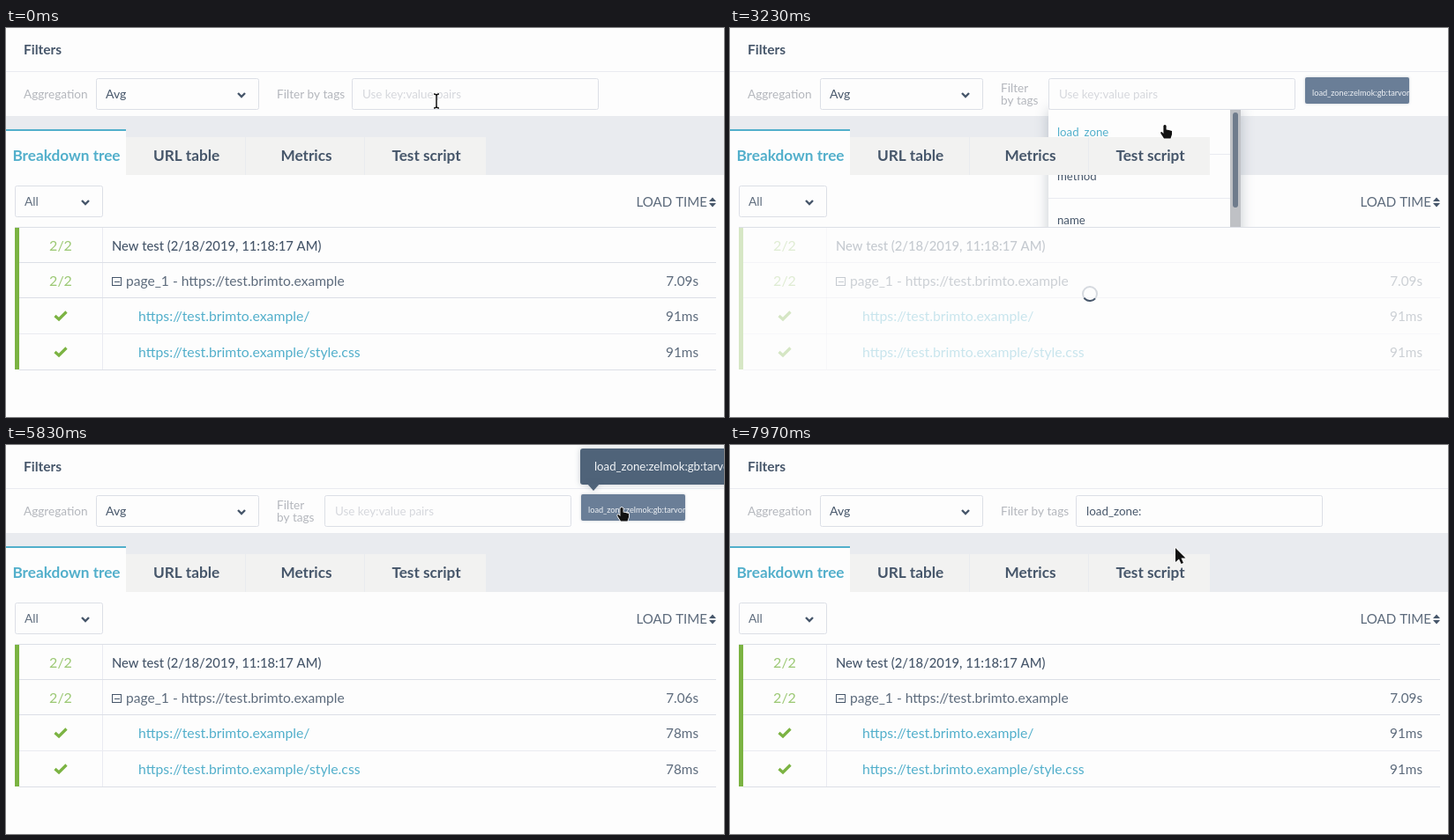
Recreate the animation shown at these times as an HTML page with a canvas. Size 814 px wide and 442 px high, loop 8000 ms.

```html
<!DOCTYPE html>
<html lang="en">
<head>
<meta charset="utf-8">
<title>Filter results by tag</title>
<style>
  html, body { margin: 0; width: 100%; height: 100%; overflow: hidden; background: #fdfdfd; }
  canvas { display: block; }
</style>
</head>
<body>
<canvas id="stage" width="814" height="442"></canvas>
<script>
const ctx = document.getElementById('stage').getContext('2d');
const LOOP = 8000;
const PAPER = '#fdfdfd', INK = '#46566a', SLATE = '#5d6b7c', MUTED = '#b4b7bd', HINT = '#d6d8dd',
      LINE = '#dcdfe6', SOFT = '#eaebf1', BLUE = '#52afcb', GREEN = '#7bb342', BAND = '#e9ebef', TAB = '#f2f2f1';
const SITE = 'https://test.brimto.example';
const TAG = 'load_zone:zelmok:gb:tarvon';
const KEYS = ['load_zone', 'method', 'name', 'proto', 'status'];
const VALUES = ['zelmok:gb:tarvon'];

// Pointer stops: time, x, y
const STOPS = [[0, 488, 83], [650, 488, 83], [1070, 492, 109], [3230, 493, 111], [4270, 493, 111],
  [4670, 685, 94], [5000, 698, 72], [5950, 698, 72], [6560, 510, 78], [6900, 510, 78],
  [7350, 505, 117], [8000, 505, 117]];
const HAND = new Path2D('M-1.6 0Q0-2 1.6 0V4.5L4.5 5 8 6V10L6.5 14.5H-1L-4.5 9Q-5.5 7-3.5 7L-1.6 9Z');
const ARROW = new Path2D('M0 0V16L4 12.5 6.5 18 9 17 6.5 11.5H11.5Z');
const IBEAM = new Path2D('M-3-8Q0-8 0-6Q0-8 3-8M0-6V6M-3 8Q0 8 0 6Q0 8 3 8');

const clamp = v => Math.max(0, Math.min(1, v));
const ramp = (t, from, to) => clamp((t - from) / (to - from));
const within = (t, from, to) => t >= from && t < to;

function text(str, x, y, size, color = INK, weight = 400, align = 'left') {
  ctx.font = `${weight} ${size}px Lato, sans-serif`;
  ctx.textAlign = align;
  ctx.fillStyle = color;
  ctx.fillText(str, x, y);
}

function rect(x, y, w, h, color) {
  ctx.fillStyle = color;
  ctx.fillRect(x, y, w, h);
}

function round(x, y, w, h, r, fill, stroke) {
  ctx.beginPath();
  ctx.roundRect(x, y, w, h, r);
  if (fill) { ctx.fillStyle = fill; ctx.fill(); }
  if (stroke) { ctx.strokeStyle = stroke; ctx.lineWidth = 1; ctx.stroke(); }
}

function line(points, color, width) {
  ctx.beginPath();
  points.forEach(([x, y]) => ctx.lineTo(x, y));
  ctx.strokeStyle = color;
  ctx.lineWidth = width;
  ctx.stroke();
}

function shadowed(blur, draw) {
  ctx.save();
  ctx.shadowColor = 'rgba(70,86,106,.3)';
  ctx.shadowBlur = blur;
  draw();
  ctx.restore();
}

function faded(alpha, draw) {
  if (alpha <= 0) return;
  ctx.save();
  ctx.globalAlpha = alpha;
  draw();
  ctx.restore();
}

const box = (x, y, w, h, stroke = LINE) => round(x + .5, y + .5, w - 1, h - 1, 2, PAPER, stroke);
const chevron = (x, y) => line([[x - 4, y - 2], [x, y + 2], [x + 4, y - 2]], INK, 2.4);

function spinner(x, y, r, width, t) {
  const turn = t / 700 * Math.PI * 2;
  const arc = (from, to, color) => {
    ctx.beginPath();
    ctx.arc(x, y, r, from, to);
    ctx.strokeStyle = color;
    ctx.lineWidth = width;
    ctx.stroke();
  };
  arc(0, 7, '#d5d9df');
  arc(turn, turn + 1.8, INK);
}

function stateAt(t) {
  const s = { tagged: within(t, 3230, 5870), value: '', drop: '', list: KEYS, alpha: 1, leaving: false };
  if (within(t, 430, 700) || within(t, 2200, 2450) || within(t, 6600, 6930)) s.drop = 'spin';
  if (within(t, 700, 1740) || within(t, 2450, 3330) || within(t, 6930, 7560)) s.drop = 'list';
  if (within(t, 2450, 3230)) s.list = VALUES;
  if (within(t, 1640, 3230) || t >= 7450) s.value = 'load_zone:';
  if (within(t, 1640, 1740)) s.alpha = 1 - ramp(t, 1640, 1740);
  if (t >= 7450) s.alpha = 1 - ramp(t, 7450, 7560);
  s.leaving = within(t, 3230, 3330);
  s.focus = within(t, 400, 1640) || within(t, 2200, 3230) || within(t, 6590, 7450);
  s.loading = within(t, 3230, 3800) || within(t, 5870, 6350);
  s.fresh = within(t, 3800, 6350);
  s.tableAlpha = s.loading ? .3 : .3 + .7 * Math.max(
    t < 3230 ? 1 : ramp(t, 3800, 3950) * (t < 5870), ramp(t, 6350, 6500));
  s.tip = within(t, 4940, 5870) ? ramp(t, 4940, 5030) : 0;
  s.inputX = s.tagged ? 361 : 392;
  return s;
}

function drawFilters(s) {
  text('Filters', 20, 30, 15.5, INK, 700);
  rect(0, 49, 814, 1, SOFT);
  text('Aggregation', 20, 80, 13.6, MUTED);
  box(102, 57, 185, 36);
  text('Avg', 113, 80, 14);
  chevron(267, 76);
  if (s.tagged) {
    text('Filter', 307, 73, 13.6, MUTED);
    text('by tags', 307, 87, 13.6, MUTED);
  } else {
    text('Filter by tags', 307, 80, 13.6, MUTED);
  }
  const x = s.inputX;
  box(x, 57, 280, 36, s.focus ? '#8fc6d8' : LINE);
  text(s.value || 'Use key:value pairs', x + 12, 80, 13.4, s.value ? INK : HINT);
  if (s.focus) rect(x + 12 + (s.value ? ctx.measureText(s.value).width + 1 : 0), 67, 1, 17, BLUE);
  if (s.tagged) {
    shadowed(3, () => round(652, 56, 118, 30, 2, '#6a7e97'));
    ctx.save();
    ctx.beginPath();
    ctx.rect(652, 56, 118, 30);
    ctx.clip();
    text(TAG, 660, 77, 9.2, '#eef1f5');
    ctx.restore();
  }
}

function drawTabs() {
  rect(136, 124, 408, 43, TAB);
  rect(271, 124, 1, 43, BAND);
  rect(406, 124, 1, 43, BAND);
  rect(0, 115, 136, 52, PAPER);
  rect(0, 115, 136, 2, BLUE);
  ['Breakdown tree', 'URL table', 'Metrics', 'Test script'].forEach((name, i) =>
    text(name, 68.5 + i * 136, 151, 17.2, i ? INK : BLUE, 700, 'center'));
}

function drawTable(s, t) {
  box(10, 179, 100, 36);
  text('All', 21, 202, 13.8, SLATE);
  chevron(90, 198);
  text('LOAD TIME', 795, 203, 15.1, SLATE, 400, 'right');
  ctx.fillStyle = INK;
  ctx.fill(new Path2D('M797 197L801 192.5L805 197ZM797 199L801 203.5L805 199Z'));

  rect(0, 227, 814, 162, PAPER);
  rect(10, 226, 795, 1, LINE);
  faded(s.tableAlpha, () => {
    rect(10, 227, 5, 161, GREEN);
    rect(109, 227, 1, 161, SOFT);
    [266, 306, 347, 388].forEach(y => rect(15, y, 790, 1, y === 347 ? SOFT : LINE));
    [253, 293].forEach(y => text('2/2', 62, y, 16, '#9bc873', 400, 'center'));
    [327, 368].forEach(y => line([[55.5, y], [60, y + 4], [68.5, y - 4.5]], GREEN, 3.2));
    text('New test (2/18/2019, 11:18:17 AM)', 120, 253, 14.75, INK, 500);
    ctx.strokeStyle = INK;
    ctx.lineWidth = 1;
    ctx.strokeRect(120.5, 283.5, 10, 9);
    rect(123, 288, 6, 1, INK);
    text('page_1 - ' + SITE, 136, 293, 15.6, SLATE);
    text(SITE + '/', 150, 333, 15.8, BLUE);
    text(SITE + '/style.css', 150, 374, 15.8, BLUE);
    const [total, part] = s.fresh ? ['7.06s', '78ms'] : ['7.09s', '91ms'];
    [[total, 293], [part, 333], [part, 374]].forEach(([v, y]) => text(v, 785, y, 15.3, SLATE, 400, 'right'));
  });
  if (s.loading) spinner(408, 302, 8, 2, t + 350);
}

function drawDropdown(s, t) {
  const x = s.inputX;
  const height = s.drop === 'spin' || s.list === VALUES ? 50 : 225;
  shadowed(14, () => rect(x, 93, 218, height, PAPER));
  if (s.drop === 'spin') return spinner(x + 109, 118, 5, 2, t + 225);
  ctx.save();
  ctx.beginPath();
  ctx.rect(x, 93, 218, height);
  ctx.clip();
  s.list.forEach((name, i) => {
    text(name, x + 10, 123 + i * 50, 13.2, i ? INK : BLUE);
    rect(x, 143 + i * 50, 206, 1, SOFT);
  });
  if (height > 50) {
    rect(x + 206, 93, 12, height, '#bfc1c5');
    round(x + 209, 96, 6, 108, 3, '#6f7c8c');
  }
  ctx.restore();
}

function drawTooltip() {
  shadowed(6, () => {
    round(651, 4, 190, 41, 3, '#4f6379');
    ctx.fill(new Path2D('M659 44L666 52L673 44Z'));
  });
  text(TAG, 667, 29, 13.2, '#f1f4f7');
}

function pointerAt(t) {
  const i = STOPS.findIndex(stop => stop[0] > t);
  const [t0, x0, y0] = STOPS[i - 1], [t1, x1, y1] = STOPS[i];
  const p = ramp(t, t0, t1), e = p * p * (3 - 2 * p);
  return [x0 + (x1 - x0) * e, y0 + (y1 - y0) * e];
}

function drawPointer(s, t) {
  const [x, y] = pointerAt(t);
  const onInput = y < 93 && x > s.inputX && x < s.inputX + 280;
  const onTag = s.tagged && y < 86 && x > 652 && x < 770;
  const onList = s.drop === 'list' && s.alpha === 1 && y >= 93;
  ctx.save();
  ctx.translate(x, y);
  ctx.lineJoin = 'round';
  if (onInput) {
    ctx.strokeStyle = '#111';
    ctx.lineWidth = 1.5;
    ctx.stroke(IBEAM);
  } else {
    const shape = onTag || onList ? HAND : ARROW;
    ctx.strokeStyle = '#fff';
    ctx.lineWidth = 1.5;
    ctx.stroke(shape);
    ctx.fillStyle = '#111';
    ctx.fill(shape);
  }
  ctx.restore();
}

function frame() {
  const t = performance.now() % LOOP;
  const s = stateAt(t);
  rect(0, 0, 814, 442, PAPER);
  rect(0, 100, 814, 67, BAND);
  // A closing list slips beneath the tabs and table
  if (s.leaving) drawDropdown(s, t);
  drawFilters(s);
  drawTabs();
  drawTable(s, t);
  if (s.drop && !s.leaving) faded(s.alpha, () => drawDropdown(s, t));
  faded(s.tip, drawTooltip);
  drawPointer(s, t);
  requestAnimationFrame(frame);
}
frame();
</script>
</body>
</html>
```
